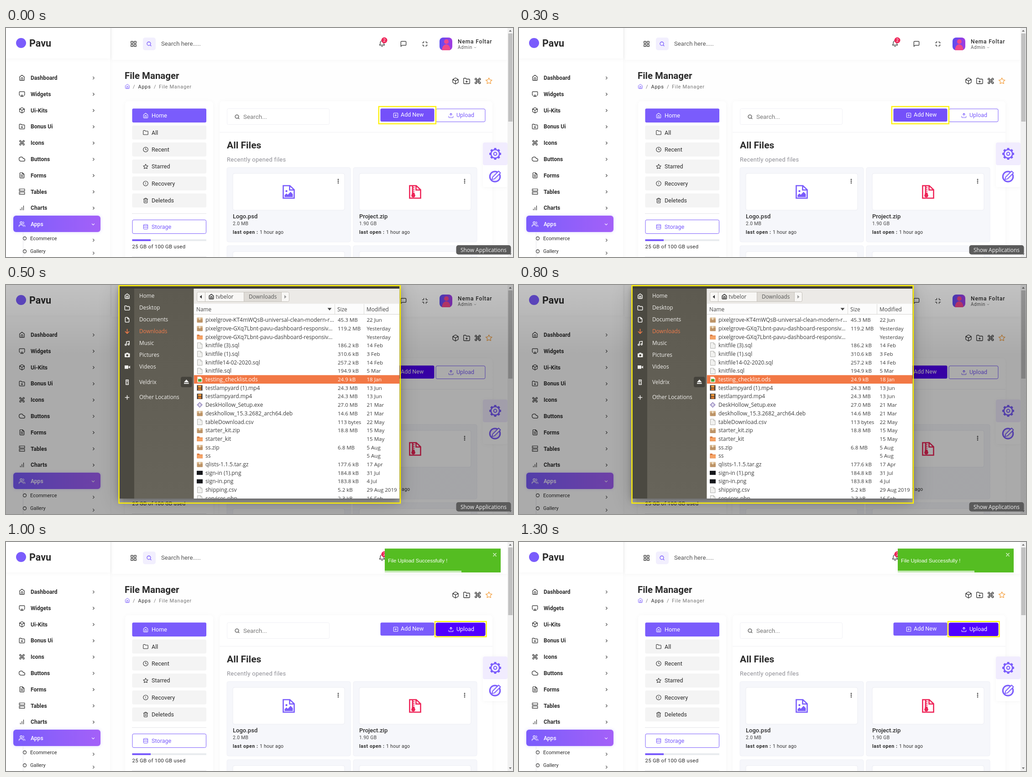
An HTML page for the animation above (1.5 s loop, 1111 by 504 pixels).

```html
<!DOCTYPE html>
<html lang="en">
<head>
<meta charset="utf-8">
<title>File upload walkthrough</title>
<style>
  html, body { margin: 0; width: 100%; height: 100%; overflow: hidden; background: #fff; }
  #stage { display: block; width: 100vw; height: 100vh; font-family: Roboto, sans-serif; }
  .desk { font-family: "Open Sans", sans-serif; }
  .toast { font-family: "Liberation Sans", Arial, sans-serif; }
</style>
</head>
<body>
<svg id="stage" viewBox="0 0 1111 504" preserveAspectRatio="none" xmlns="http://www.w3.org/2000/svg"></svg>
<script>
const PURPLE = '#7a5cfc', INK = '#2b2b2b', YELLOW = '#fff000', LOOP = 1500, STEP = 500;

// 24 x 24 line icons
const disc = 'M12 2a10 10 0 1 0 0 20 10 10 0 0 0 0-20z';
const folder = 'M22 19a2 2 0 0 1-2 2H4a2 2 0 0 1-2-2V5a2 2 0 0 1 2-2h5l2 3h9a2 2 0 0 1 2 2z';
const ICONS = {
  home: 'M3 9l9-7 9 7v11a2 2 0 0 1-2 2H5a2 2 0 0 1-2-2zM9 22V12h6v10',
  screen: 'M5 17H4a2 2 0 0 1-2-2V5a2 2 0 0 1 2-2h16a2 2 0 0 1 2 2v10a2 2 0 0 1-2 2h-1M12 15l5 6H7z',
  box: 'M21 16V8a2 2 0 0 0-1-1.7l-7-4a2 2 0 0 0-2 0l-7 4A2 2 0 0 0 3 8v8a2 2 0 0 0 1 1.7l7 4a2 2 0 0 0 2 0l7-4a2 2 0 0 0 1-1.7zM3.3 7l8.7 5 8.7-5M12 22V12',
  folder,
  folderPlus: folder + 'M12 11v6M9 14h6',
  command: 'M18 3a3 3 0 0 0-3 3v12a3 3 0 1 0 3-3H6a3 3 0 1 0 3 3V6a3 3 0 1 0-3 3h12a3 3 0 0 0 0-6z',
  cloud: 'M18 10h-1.3A8 8 0 1 0 9 20h9a5 5 0 0 0 0-10z',
  file: 'M14 2H6a2 2 0 0 0-2 2v16a2 2 0 0 0 2 2h12a2 2 0 0 0 2-2V8zM14 2v6h6',
  fileText: 'M14 2H6a2 2 0 0 0-2 2v16a2 2 0 0 0 2 2h12a2 2 0 0 0 2-2V8zM14 2v6h6M16 13H8M16 17H8M10 9H8',
  server: 'M2 2h20v8H2zM2 14h20v8H2zM6 6h.1M6 18h.1',
  bars: 'M12 20V10M18 20V4M6 20v-4',
  users: 'M17 21v-2a4 4 0 0 0-4-4H5a4 4 0 0 0-4 4v2M23 21v-2a4 4 0 0 0-3-3.9M16 3.1a4 4 0 0 1 0 7.8M9 3a4 4 0 1 0 0 8 4 4 0 0 0 0-8z',
  grid: 'M3 3h7v7H3zM14 3h7v7h-7zM14 14h7v7h-7zM3 14h7v7H3z',
  search: 'M11 3a8 8 0 1 0 0 16 8 8 0 0 0 0-16zM21 21l-4.4-4.4',
  bell: 'M18 8A6 6 0 0 0 6 8c0 7-3 9-3 9h18s-3-2-3-9M13.7 21a2 2 0 0 1-3.4 0',
  chat: 'M21 15a2 2 0 0 1-2 2H7l-4 4V5a2 2 0 0 1 2-2h14a2 2 0 0 1 2 2z',
  shrink: 'M8 3v3a2 2 0 0 1-2 2H3m18 0h-3a2 2 0 0 1-2-2V3m0 18v-3a2 2 0 0 1 2-2h3M3 16h3a2 2 0 0 1 2 2v3',
  star: 'M12 2l3.1 6.3 6.9 1-5 4.8 1.2 6.9-6.2-3.2L5.8 21 7 14.1 2 9.3l6.9-1z',
  clock: disc + 'M12 6v6l4 2',
  alert: disc + 'M12 8v4M12 16h.1',
  trash: 'M3 6h18M19 6v14a2 2 0 0 1-2 2H7a2 2 0 0 1-2-2V6m3 0V4a2 2 0 0 1 2-2h4a2 2 0 0 1 2 2v2M10 11v6M14 11v6',
  database: 'M12 2c5 0 9 1.3 9 3s-4 3-9 3-9-1.3-9-3 4-3 9-3zM21 12c0 1.7-4 3-9 3s-9-1.3-9-3M3 5v14c0 1.7 4 3 9 3s9-1.3 9-3V5',
  plusBox: 'M5 3h14a2 2 0 0 1 2 2v14a2 2 0 0 1-2 2H5a2 2 0 0 1-2-2V5a2 2 0 0 1 2-2zM12 8v8M8 12h8',
  upload: 'M21 15v4a2 2 0 0 1-2 2H5a2 2 0 0 1-2-2v-4M17 8l-5-5-5 5M12 3v12',
  right: 'M9 18l6-6-6-6',
  down: 'M6 9l6 6 6-6',
  arrowDown: 'M12 2v18M4 12l8 8 8-8',
  music: 'M9 18V5l12-2v13M6 15a3 3 0 1 0 .1 0zM18 13a3 3 0 1 0 .1 0z',
  phone: 'M7 2h10v20H7zM12 6v4M12 17h.1',
  plus: 'M12 4v16M4 12h16',
  close: 'M5 5l14 14M19 5L5 19'
};

const rect = (x, y, w, h, fill, rx = 0, more = '') =>
  `<rect x="${x}" y="${y}" width="${w}" height="${h}" fill="${fill}" rx="${rx}" ${more}/>`;
const outline = (x, y, w, h, color, width = 1, rx = 0) =>
  rect(x, y, w, h, 'none', rx, `stroke="${color}" stroke-width="${width}"`);
const circle = (x, y, r, fill, more = '') => `<circle cx="${x}" cy="${y}" r="${r}" fill="${fill}" ${more}/>`;
const shape = (d, fill, more = '') => `<path d="${d}" fill="${fill}" ${more}/>`;
const line = (d, color, width = 1, more = '') => shape(d, 'none', `stroke="${color}" stroke-width="${width}" ${more}`);
const text = (x, y, str, size, fill = INK, weight = 400, spacing = 0) =>
  `<text x="${x}" y="${y}" font-size="${size}" fill="${fill}" font-weight="${weight}" letter-spacing="${spacing}">${str}</text>`;
const icon = (name, x, y, size, color = INK, width = 2) =>
  `<path d="${ICONS[name]}" transform="translate(${x - size / 2} ${y - size / 2}) scale(${size / 24})"
    fill="none" stroke="${color}" stroke-width="${width}" stroke-linecap="round" stroke-linejoin="round"/>`;

const defs = `<defs>
  <linearGradient id="active"><stop stop-color="${PURPLE}"/><stop offset="1" stop-color="#a461f8"/></linearGradient>
  <linearGradient id="portrait"><stop stop-color="#5b4cf0"/><stop offset="1" stop-color="#a33be0"/></linearGradient>
  <linearGradient id="side" x2="0" y2="1"><stop stop-color="#5d5a50"/><stop offset="1" stop-color="#67645a"/></linearGradient>
  <linearGradient id="dim" x2="0" y2="1"><stop stop-opacity=".24"/><stop offset=".3" stop-opacity=".33"/></linearGradient>
  <filter id="soft" x="-10%" y="-20%" width="120%" height="140%"><feDropShadow dx="0" dy="1" stdDeviation="4" flood-opacity=".035"/></filter>
  <filter id="glow" x="-10%" y="-40%" width="120%" height="180%"><feDropShadow dx="0" dy="0" stdDeviation="3" flood-color="${PURPLE}" flood-opacity=".3"/></filter>
  <filter id="wide" x="-50%" y="-50%" width="200%" height="200%"><feGaussianBlur stdDeviation="24"/></filter>
  <filter id="near" x="-10%" y="-10%" width="120%" height="120%"><feGaussianBlur stdDeviation="8"/></filter>
  <clipPath id="avatar"><rect x="950" y="21" width="28" height="28" rx="8"/></clipPath>
</defs>`;
const SOFT = 'filter="url(#soft)"';

function sidebar() {
  const items = [['Dashboard', 'home'], ['Widgets', 'screen'], ['Ui-Kits', 'box'], ['Bonus Ui', 'folderPlus'],
    ['Icons', 'command'], ['Buttons', 'cloud'], ['Forms', 'fileText'], ['Tables', 'server'], ['Charts', 'bars'], ['Apps', 'users']];
  const rows = items.map(([label, name], i) => {
    const y = 109.5 + 35.8 * i, open = label === 'Apps', color = open ? '#fff' : INK;
    return (open ? rect(16, 413, 191, 36, 'url(#active)', 6, 'filter="url(#glow)"') : '') +
      icon(name, 35, y, 14, color) + text(54, y + 4.4, label, 12.1, color, open ? 500 : 600) +
      icon(open ? 'down' : 'right', open ? 191 : 192, y + .5, 10.5, color, 2.4);
  }).join('');
  const children = [['Ecommerce', 463], ['Gallery', 491.5]].map(([label, y]) =>
    circle(41, y, 3.5, '#fff', 'stroke="#444" stroke-width="1.3"') + text(53, y + 3.8, label, 11) +
    icon('right', 192, y + 4, 10.5, INK, 2.4)).join('');
  return rect(0, -10, 228, 530, '#fff', 0, SOFT) + rect(0, -10, 228, 77, '#fff', 0, SOFT) +
    circle(33, 33, 11, PURPLE) + text(51, 41, 'Pavu', 21.5, INK, 700) +
    rows + line('M37.5 450V504', '#e6e6ea') + children;
}

function header() {
  return rect(232, -10, 867, 80, '#fff', 0, SOFT) + icon('grid', 279.5, 35, 15) +
    rect(300, 21, 28, 28, '#f2effe', 5) + icon('search', 313.5, 35, 12, PURPLE, 2.6) +
    text(340, 39, 'Search here.....', 13.2, '#555') +
    icon('bell', 824, 34.5, 15) + circle(829, 27, 6.5, '#ee2558') + text(826.4, 30.4, '2', 9.5, '#fff') +
    icon('chat', 871, 35, 15) + icon('shrink', 918, 35, 15) +
    `<g clip-path="url(#avatar)">${rect(950, 21, 28, 28, 'url(#portrait)')}
      ${circle(965, 30, 5, '#f0478a')}${shape('M955 50Q956 37 964 36Q973 36 974 50z', '#f0478a')}</g>` +
    text(990, 33.5, 'Nema Foltar', 12, INK, 500, .85) + text(990, 46.3, 'Admin', 10, '#555', 400, .6) +
    icon('down', 1028, 43, 7.5, '#555');
}

function menuCard() {
  const items = [['Home', 'home'], ['All', 'folder'], ['Recent', 'clock'], ['Starred', 'star'], ['Recovery', 'alert'], ['Deleteds', 'trash']];
  return rect(261, 161, 193, 360, '#fff', 8, SOFT) + items.map(([label, name], i) => {
    const y = 177.2 + 37.4 * i, color = i ? INK : '#fff';
    return rect(276.5, y, 162.5, 30.8, i ? '#f4f4f4' : PURPLE, 3) +
      icon(name, 306, y + 15.5, 12.5, color) + text(319, y + 19.9, label, 12.6, color);
  }).join('') + line('M276 408.5H439M276 503.5H439', '#e4e4e8') +
    outline(277, 422.3, 161.5, 30.2, PURPLE, 1, 3) + icon('database', 306, 437.5, 12.5, PURPLE) +
    text(319, 441.8, 'Storage', 12.6, PURPLE) +
    rect(276.5, 465, 162.5, 4, '#e9ecef') + rect(276.5, 465, 40.6, 4, PURPLE) +
    text(276.5, 485, '25 GB of 100 GB used', 11.4, INK, 400, .3);
}

const tile = (x, y) => rect(x, y, 271, 164, '#f6f7fb', 4, 'stroke="#eff0f6"') +
  rect(x + 13, y + 13, 245, 81, '#fff', 4, 'stroke="#ebecf3"');

function fileTile(x, name, size, color, art) {
  const page = `M${x + 123.5} 347H${x + 138}L${x + 147.5} 356V374.5H${x + 123.5}zM${x + 137.5} 347V356.5H${x + 147.5}`;
  return tile(x, 307) + [333.3, 337.2, 341.1].map(y => circle(x + 244, y, 1.35, '#444')).join('') +
    line(page, color, 2.6) + art +
    text(x + 13, 418.7, name, 13, INK, 500) + text(x + 13, 433.5, size, 10.4, '#444', 400, .3) +
    text(x + 13, 453.3, 'last open :', 10.6, INK, 700, .55) + text(x + 72, 453.3, '1 hour ago', 10.6, '#333', 400, .2);
}

function filesCard() {
  const photo = circle(614.5, 359, 2.2, PURPLE) + shape('M610.5 372v-4l4-4 3 3 6-6.5 5 5v6.5z', PURPLE);
  const zip = line('M891 348V365', '#ee2558', 3) + line('M894 350V365', '#ee2558', 2, 'stroke-dasharray="2 2"') +
    shape('M890 363h5l2 6q-1 4-4.5 4t-4.5-4z', '#ee2558');
  return rect(468, 161, 598, 360, '#fff', 8, SOFT) + outline(484.5, 177.5, 224, 35, '#f0f0f5', 1, 3) +
    icon('search', 506.5, 195.5, 11.5, '#666', 3.2) + text(520, 200, 'Search...', 13.4, '#777') +
    line('M468 229.5H1066', '#f0f0f4') +
    text(484, 264.5, 'All Files', 21, INK, 600) + text(484, 294, 'Recently opened files', 13, '#8d8d94', 400, .3) +
    fileTile(484, 'Logo.psd', '2.0 MB', PURPLE, photo) + fileTile(761, 'Project.zip', '1.90 GB', '#ee2558', zip) +
    tile(484, 479) + tile(761, 479);
}

function floatingTools() {
  const teeth = Array.from({ length: 8 }, (_, i) => rect(1069.5, 264, 5, 5, PURPLE, 1, `transform="rotate(${i * 45} 1072 277)"`)).join('');
  return rect(1045, 252, 54, 98, '#fff', 4, SOFT) + rect(1045, 252, 54, 50, '#f1ecfe', 4) + teeth +
    circle(1072, 277, 9.3, '#f1ecfe', `stroke="${PURPLE}" stroke-width="2.6"`) +
    circle(1072, 277, 3.4, 'none', `stroke="${PURPLE}" stroke-width="2"`) +
    circle(1071.5, 327, 11.3, '#f1ecfe', `stroke="${PURPLE}" stroke-width="3"`) +
    shape('M1065 333.5l1.5-5.500 13-13 4 4-13 13z', '#fff', `stroke="${PURPLE}" stroke-width="1.8" stroke-linejoin="round"`);
}

function page() {
  const tools = ['box', 'folderPlus', 'command', 'star'].map((name, i) =>
    icon(name, 985 + 24.4 * i, 116.5, 16, name === 'star' ? '#f5a142' : INK, 1.9)).join('');
  return rect(0, 0, 1111, 504, '#fefefe') + header() + sidebar() +
    text(260, 112, 'File Manager', 20.4, INK, 600) + icon('home', 266, 128.5, 11.5, PURPLE) +
    text(278, 132.6, '/', 11, '#777') + text(289.5, 132.6, 'Apps', 11, INK, 400, .7) +
    text(324, 132.6, '/', 11, '#777') + text(335, 132.6, 'File Manager', 11, '#777', 400, .7) + tools +
    menuCard() + filesCard() + floatingTools() +
    rect(1099, 0, 12, 504, '#f1f1f1') + shape('M1102 8l3-4 3 4z', '#777') + shape('M1102 496l3 4 3-4z', '#777');
}

const scrollThumb = bottom => rect(1100.5, 12, 9.5, bottom - 12, '#c1c1c1');
const addButton = fill => rect(820.5, 177.3, 118, 28.7, fill, 3) + icon('plusBox', 854, 192, 12.5, '#fff') +
  text(865, 195.4, 'Add New', 12.5, '#fff');
function uploadButton(active) {
  const color = active ? '#fff' : PURPLE;
  return rect(942, 178, 108, 28.5, active ? '#5000ff' : '#fff', 3, `stroke="${active ? '#5000ff' : PURPLE}"`) +
    icon('upload', 975, 192.5, 12.5, color) + text(987, 196.2, 'Upload', 12.5, color);
}

// Small file type pictures, drawn around x = 424.5
const sheetPath = y => `M419.5 ${y - 6}h7l3.5 3.5v9h-10.5z`;
const FILE_ART = {
  pack: y => rect(418.5, y - 5, 12.5, 11, '#bd9468', 1) + rect(418.5, y - 5, 12.5, 3.5, '#d8b88f', 1) + rect(423, y - 5, 3, 5, '#eee0c8'),
  dir: y => shape(`M418.5 ${y - 5}h5l1 2h6.5v8.5h-12.5z`, '#d9783d') + rect(419.5, y - 2, 11.5, 7, '#f6a365', 1),
  doc: y => shape(sheetPath(y), '#f2f2f0', 'stroke="#a9a9a5" stroke-width=".9"') + line(`M426.5 ${y - 6}v3.5h3.5`, '#a9a9a5', .8),
  sheet: y => shape(sheetPath(y), '#fff') + rect(421, y - 1, 7.5, 6, '#48a832'),
  film: y => rect(418.5, y - 6, 12, 12, '#443a32') + rect(421, y - 5, 7, 4.5, '#ef9a3c') + rect(421, y + .7, 7, 4.5, '#d9792e'),
  app: y => shape(`M424.5 ${y - 6.5}l6.5 6.5-6.5 6.5-6.5-6.5z`, '#a59ac8') + shape(`M424.5 ${y - 4}l3 4-3 4-3-4z`, '#e4e0f0'),
  shot: y => rect(418, y - 4.5, 13, 9, '#16181c')
};

const FILES = [
  ['pack', 'pixelgrove-KT4mWQsB-universal-clean-modern-r...', '45.3 MB', '22 Jun'],
  ['pack', 'pixelgrove-GXq7Lbnt-pavu-dashboard-responsiv...', '119.2 MB', 'Yesterday'],
  ['dir', 'pixelgrove-GXq7Lbnt-pavu-dashboard-responsiv...', '', 'Yesterday'],
  ['doc', 'knitfile (3).sql', '186.2 kB', '14 Feb'],
  ['doc', 'knitfile (1).sql', '310.6 kB', '3 Feb'],
  ['doc', 'knitfile14-02-2020.sql', '257.2 kB', '14 Feb'],
  ['doc', 'knitfile.sql', '194.9 kB', '5 Mar'],
  ['sheet', 'testing_checklist.ods', '24.9 kB', '18 Jan'],
  ['film', 'testlampyard (1).mp4', '24.3 MB', '13 Jun'],
  ['film', 'testlampyard.mp4', '24.3 MB', '13 Jun'],
  ['app', 'DeskHollow_Setup.exe', '27.0 MB', '21 Mar'],
  ['pack', 'deskhollow_15.3.2682_arch64.deb', '14.6 MB', '21 Mar'],
  ['doc', 'tableDownload.csv', '113 bytes', '22 May'],
  ['pack', 'starter_kit.zip', '18.8 MB', '15 May'],
  ['dir', 'starter_kit', '', '15 May'],
  ['pack', 'ss.zip', '6.8 MB', '5 Aug'],
  ['dir', 'ss', '', '5 Aug'],
  ['pack', 'qlists-1.1.5.tar.gz', '177.6 kB', '17 Apr'],
  ['shot', 'sign-in (1).png', '184.8 kB', '31 Jul'],
  ['shot', 'sign-in.png', '183.8 kB', '4 Jul'],
  ['doc', 'shipping.csv', '5.2 kB', '29 Aug 2019'],
  ['doc', 'services.php', '2.3 kB', '16 Feb']
];

function places() {
  const items = [['Home', 24, 'home'], ['Desktop', 50, 'folder'], ['Documents', 76, 'file'], ['Downloads', 102, 'arrowDown'],
    ['Music', 128, 'music'], ['Pictures', 154], ['Videos', 180], ['Veldrix', 213.5, 'phone'], ['Other Locations', 247, 'plus']];
  return rect(249, 8, 162, 462, 'url(#side)') + rect(249, 8, 32, 462, '#4b4941') +
    items.map(([label, y, name]) => {
      const color = label === 'Downloads' ? '#f47c4a' : '#f2f1ee';
      return (name ? icon(name, 265.5, y + .5, 12.5, color, 3) : '') + text(292, y + 4.3, label, 11.8, color);
    }).join('') +
    rect(260, 150.5, 11.5, 8.5, '#f2f1ee', 1) + rect(263.5, 149, 4.5, 3, '#f2f1ee') + circle(265.7, 154.8, 2.4, '#4b4941') +
    rect(260, 177, 8, 7.5, '#f2f1ee') + shape('M268 180.7l4-3.2v6.5z', '#f2f1ee') +
    rect(383, 202, 24.5, 23, '#45433c', 4) + shape('M390 214l5.3-6 5.3 6z', '#fff') + rect(390, 215.5, 10.6, 2, '#fff');
}

function pathBar() {
  return rect(411, 8, 451, 33.5, '#eceae7') + rect(418.5, 15.5, 202, 21, '#f8f7f5', 3, 'stroke="#c4c0b9"') +
    rect(521.5, 16, 82, 20, '#dedbd6') + line('M436.5 16v20M521.5 16v20M603.5 16v20', '#c4c0b9') +
    shape('M429 22v8l-4.5-4z', '#333') + shape('M610 22v8l4.5-4z', '#999') +
    icon('home', 450, 25.5, 12.5, '#333', 3.2) + text(459.5, 30, 'tvbelor', 11.8, '#444') + text(532, 30, 'Downloads', 11.8, '#555') +
    rect(411, 41.5, 451, 23, '#fcfcfc') + line('M411 64.5H862', '#d6d4d0') + line('M720.5 42V64M784.5 42V64', '#dddbd7') +
    text(417, 57.5, 'Name', 11.8, '#444') + shape('M704.5 50.5h9l-4.5 5.5z', '#444') +
    text(726, 57.5, 'Size', 11.8, '#444') + text(790, 57.5, 'Modified', 11.8, '#444');
}

function fileDialog() {
  const rows = FILES.map(([kind, name, size, date], i) => {
    const y = 76.8 + 18.7 * i, chosen = kind === 'sheet', color = chosen ? '#fff' : '#3c3c3c';
    return (chosen ? rect(411, y - 9.3, 451, 18.7, '#f27845') : '') + FILE_ART[kind](y) +
      text(437, y + 4.3, name, 12, color) + text(727, y + 4.3, size, 11.5, color) + text(790.5, y + 4.3, date, 11.5, color);
  }).join('');
  return rect(0, 0, 1111, 504, 'url(#dim)') +
    rect(249, 3, 613, 475, '#000', 0, 'opacity=".2" filter="url(#wide)"') +
    rect(249, 6, 613, 468, '#000', 0, 'opacity=".35" filter="url(#near)"') +
    `<svg class="desk" width="862" height="470">${rect(249, 2, 613, 468, '#fff')}${rect(249, 2, 613, 7, '#3d3c37')}
      ${places()}${pathBar()}${rows}${line('M411.5 8V470', '#b9b6b0')}</svg>` +
    outline(247.5, 1.5, 616.5, 478.5, YELLOW, 2.4);
}

const toast = () => rect(830, 14.5, 254, 52.5, '#54bd24', 0, SOFT) + rect(830, 63, 168, 4, '#c3e8b3') +
  `<g class="toast">${text(837, 45, 'File Upload Successfully !', 11.4, '#fff')}</g>` + icon('close', 1071, 28, 11, '#eefbe8', 2.6);
const tooltip = () => rect(986.5, 478, 120, 20.5, '#5b5b5b', 5) +
  `<g class="desk">${text(996, 492.6, 'Show Applications', 11.9, '#f4f4f4')}</g>`;

const scenes = [
  scrollThumb(206) + uploadButton(false) + addButton('#7450fa') + outline(816.8, 172.8, 125.2, 38, YELLOW, 2.2) + tooltip(),
  scrollThumb(206) + uploadButton(false) + addButton('#5000f5') + fileDialog() + tooltip(),
  scrollThumb(161) + addButton(PURPLE) + uploadButton(true) + outline(940, 175, 112.5, 33.5, YELLOW, 2.2) + toast()
];

const stage = document.getElementById('stage');
stage.innerHTML = defs + page() + scenes.map(s => `<g class="scene">${s}</g>`).join('');
const layers = stage.querySelectorAll('.scene');

function draw(now) {
  const current = Math.floor(now % LOOP / STEP);
  layers.forEach((layer, i) => { layer.style.display = i === current ? '' : 'none'; });
}
const start = performance.now();
function tick() {
  draw(performance.now() - start);
  requestAnimationFrame(tick);
}
tick();
</script>
</body>
</html>
```
